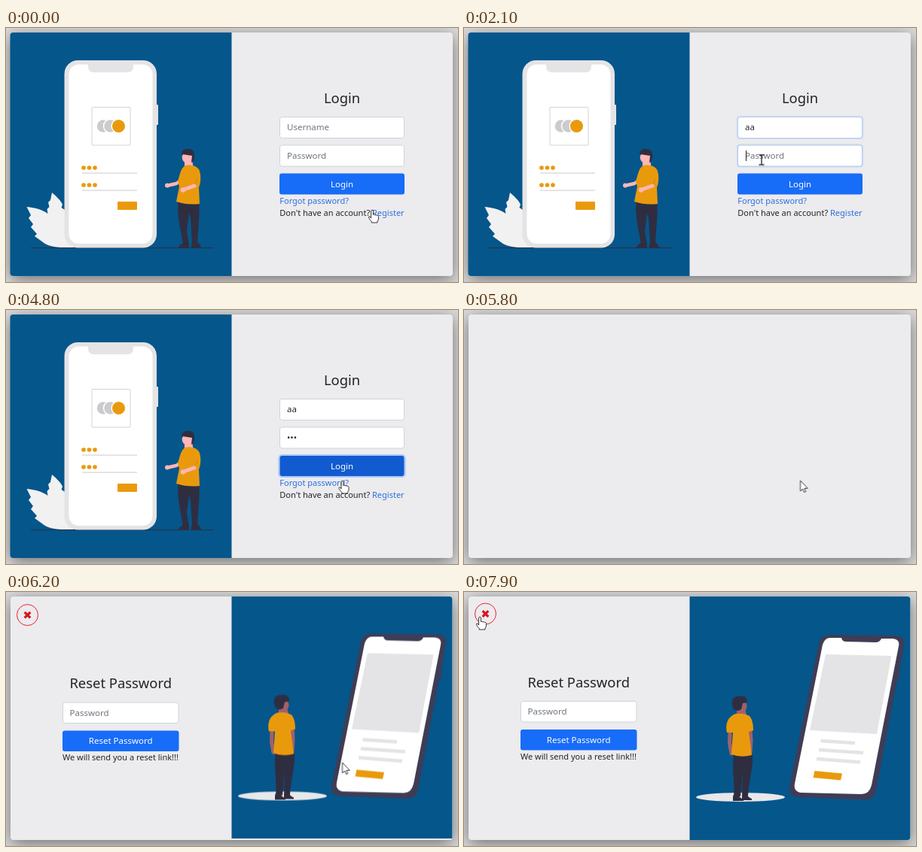
Recreate the animation shown at these times as an HTML page. Size 600x338 px, loop 8 s.

```html
<!DOCTYPE html>
<html lang="en">
<head>
<meta charset="utf-8">
<title>Login and password reset</title>
<style>
html, body { margin: 0; width: 100%; height: 100%; overflow: hidden; background: #dcdcdc; }
.stage { position: relative; width: 600px; height: 338px; overflow: hidden; }
.card { position: absolute; left: 5.5px; top: 6px; width: 587px; height: 324px; border-radius: 4px;
  background: #ecebee; box-shadow: 0 5px 22px rgba(0,0,0,.5); }
svg { position: absolute; left: 0; top: 0; }
text { font: 11.5px "Noto Sans", "Open Sans", sans-serif; fill: #212529; }
.h { font-size: 18.4px; }
.s { font-size: 11px; }
.mid { text-anchor: middle; }
.link { fill: #2b70dc; }
.hint { fill: #6f767d; }
.light { fill: #fff; }
.box { fill: #fff; stroke: #d0d3d8; }
.btn { fill: #176cf8; }
.ring { fill: none; stroke: #a9c9f7; stroke-width: 2.2; opacity: 0; }
.panel { fill: #05568b; }
.ink { fill: #2f2e41; }
.gold { fill: #e99a0c; }
.skin { fill: #ffb6b6; }
.brown { fill: #9f616a; }
.limb { fill: none; stroke-linecap: round; stroke-linejoin: round; }

/* Continuous motion */
.press, .ring, .slide, .cursor { animation: 8s linear infinite; }
.press { fill: #115ad0; opacity: 0; animation-name: press; }
.ring-user { animation-name: ringUser; }
.ring-pass { animation-name: ringPass; }
.ring-btn { animation-name: ringBtn; }
.rise { animation-name: rise; }
.drop { animation-name: drop; }
.cursor { animation-name: move; animation-timing-function: ease-in-out; }

/* Hard switches */
.flip { animation: 8s step-end infinite; }
.login { animation-name: login; }
.reset { animation-name: reset; }
.hint-user { animation-name: hintUser; }
.hint-pass { animation-name: hintPass; }
.type-user { animation-name: typeUser; }
.type-pass { animation-name: typePass; }
.caret { animation-name: caret; }
.blink { animation: blink 1s step-end infinite; }
.hand { animation-name: hand; }
.arrow { animation-name: arrow; }
.beam { animation-name: beam; }

@keyframes login { 0% { opacity: 1 } 71.875%, 100% { opacity: 0 } }
@keyframes reset { 0% { opacity: 0 } 71.875%, 100% { opacity: 1 } }
@keyframes rise {
  0%, 72.75% { transform: translateY(324px); animation-timing-function: ease }
  78%, 100% { transform: none }
}
@keyframes drop {
  0%, 72.75% { transform: translateY(-324px); animation-timing-function: ease }
  78%, 100% { transform: none }
}
@keyframes press {
  0%, 5.4% { opacity: 0 } 6.7% { opacity: .7 } 8.5%, 41.3% { opacity: 0 } 43.2%, 100% { opacity: 1 }
}
@keyframes ringUser { 0%, 12.5% { opacity: 0 } 14.4%, 25.3% { opacity: 1 } 27.2%, 100% { opacity: 0 } }
@keyframes ringPass { 0%, 25.3% { opacity: 0 } 27.2%, 47.5% { opacity: 1 } 49.4%, 100% { opacity: 0 } }
@keyframes ringBtn { 0%, 47.5% { opacity: 0 } 49.4%, 100% { opacity: 1 } }
@keyframes hintUser { 0% { opacity: 1 } 16.5%, 100% { opacity: 0 } }
@keyframes hintPass { 0% { opacity: 1 } 30%, 100% { opacity: 0 } }
@keyframes typeUser {
  0% { clip-path: inset(0 100% 0 0) } 16.5% { clip-path: inset(0 50% 0 0) } 18.5%, 100% { clip-path: inset(0) }
}
@keyframes typePass {
  0% { clip-path: inset(0 100% 0 0) } 30% { clip-path: inset(0 66.6% 0 0) }
  32.5% { clip-path: inset(0 33.3% 0 0) } 35%, 100% { clip-path: inset(0) }
}
@keyframes caret {
  0% { opacity: 0; transform: translate(373.5px, 132.5px) }
  12.5% { opacity: 1; transform: translate(373.5px, 132.5px) }
  16.5% { opacity: 1; transform: translate(380px, 132.5px) }
  18.5% { opacity: 1; transform: translate(386.5px, 132.5px) }
  25.3% { opacity: 1; transform: translate(373.5px, 170px) }
  30% { opacity: 1; transform: translate(378px, 170px) }
  32.5% { opacity: 1; transform: translate(382.5px, 170px) }
  35% { opacity: 1; transform: translate(387px, 170px) }
  47.5%, 100% { opacity: 0; transform: translate(387px, 170px) }
}
@keyframes blink { 0% { opacity: 1 } 50%, 100% { opacity: 0 } }
@keyframes move {
  0%, 3% { transform: translate(486px, 242px) }
  11%, 20.5% { transform: translate(415px, 134px) }
  24.5%, 38% { transform: translate(395px, 175.5px) }
  43.5%, 53% { transform: translate(411px, 202px) }
  58.5%, 80% { transform: translate(446.5px, 227px) }
  90%, 100% { transform: translate(21px, 33px) }
}
@keyframes hand {
  0% { opacity: 1 } 4.2% { opacity: 0 } 5.4% { opacity: 1 } 6.7% { opacity: 0 }
  41.3% { opacity: 1 } 71.875% { opacity: 0 } 88.6%, 100% { opacity: 1 }
}
@keyframes arrow {
  0% { opacity: 0 } 4.2% { opacity: 1 } 5.4% { opacity: 0 } 6.7% { opacity: 1 } 7.2% { opacity: 0 }
  40.2% { opacity: 1 } 41.3% { opacity: 0 } 71.875% { opacity: 1 } 88.6%, 100% { opacity: 0 }
}
@keyframes beam { 0% { opacity: 0 } 7.2% { opacity: 1 } 40.2%, 100% { opacity: 0 } }
</style>
</head>
<body>
<div class="stage">
<div class="card"></div>
<svg width="600" height="338" viewBox="0 0 600 338">
<defs>
  <clipPath id="card"><rect x="5.5" y="6" width="587" height="324" rx="4"/></clipPath>
  <g id="stars">
    <g id="star" class="limb" stroke="#e99a0c" stroke-width="2.2">
      <path d="M103 -2V2M101.2 -1L104.8 1M104.8 -1L101.2 1"/>
    </g>
    <use href="#star" x="7.5"/><use href="#star" x="15"/>
    <path d="M101 7.2H174" stroke="#d6d6d8" stroke-width="1.3"/>
  </g>
</defs>

<g clip-path="url(#card)">
  <g class="flip login">
    <rect class="panel" x="5" y="6" width="294.5" height="324"/>
    <!-- leaves -->
    <path fill="#f1f1f2" d="M87 292C70 293 56 291 49 285L38 277L41 274L33 265L36 261L30 253L33 249L27.500 238C39 239 49 242 55.500 247L54.500 241L57.500 238L56 232L59 229L61 219C68 225 73 230 75 235L73.500 239L78 242L90 262V292Z"/>
    <path d="M33 292.600H275" stroke="#2f2e41"/>
    <!-- phone -->
    <rect x="198" y="102" width="4" height="27" rx="1" fill="#e4e4e6"/>
    <rect x="77.500" y="43" width="122.500" height="249.500" rx="18" fill="#e4e4e6"/>
    <rect x="83.500" y="48.500" width="111" height="238.500" rx="13" fill="#fff"/>
    <path fill="#e4e4e6" d="M109 48V51Q109 59 117 59H161Q169 59 169 51V48Z"/>
    <rect x="114" y="105.500" width="51" height="50.500" rx="1" fill="#fff" stroke="#d3d3d6"/>
    <circle cx="129" cy="130.500" r="8.200" fill="#cbcbcd"/>
    <circle cx="138.500" cy="130.500" r="9" fill="#cbcbcd" stroke="#fff" stroke-width="1.500"/>
    <circle class="gold" cx="149.500" cy="130.500" r="9.300" stroke="#fff" stroke-width="1.500"/>
    <use href="#stars" y="186"/><use href="#stars" y="209"/>
    <rect class="gold" x="148" y="231" width="26" height="11" rx="1"/>
    <!-- man -->
    <path class="ink" d="M229 229L256 230C258 245 255 265 254 287L247 288L245 253L243 247L240 270L243 288L235 288C232 268 226 248 229 229Z"/>
    <path class="ink" d="M228 293Q230 288 236 286L243 287V293ZM246 293Q245 289 247 286L254 285Q259 289 259 293Z"/>
    <path class="skin" d="M237 176H247L249 187H237Z"/>
    <path class="limb" d="M232 203L226 207L215 209.500" stroke="#ffb6b6" stroke-width="4.500"/>
    <circle class="skin" cx="214" cy="209.500" r="3"/>
    <path class="gold" d="M238 183C245 181 252 183 256 188C259 194 259 205 256 212L257 234Q241 236 226 231L230 211L228 204C231 195 232 186 238 183Z"/>
    <path d="M254 200L251 210L242 213" fill="none" stroke="#c98309" stroke-width=".7"/>
    <path class="limb" d="M250 210L236 215" stroke="#ffb6b6" stroke-width="5"/>
    <circle class="skin" cx="235" cy="215.500" r="3.200"/>
    <circle class="skin" cx="241" cy="172.500" r="7.300"/>
    <path class="ink" d="M233 168C233 162 239 160 243 161C249 161 251 167 250 173Q249 178 246 179L247 170L234 168Z"/>

    <text class="h mid" x="446" y="99.700">Login</text>
    <rect class="box" x="363.500" y="118.500" width="165" height="28" rx="3"/>
    <rect class="ring ring-user" x="363" y="118" width="166" height="29" rx="3.500"/>
    <text class="hint flip hint-user" x="373" y="136.300">Username</text>
    <text class="flip type-user" x="373" y="136.300">aa</text>
    <rect class="box" x="363.500" y="156" width="165" height="28" rx="3"/>
    <rect class="ring ring-pass" x="363" y="155.500" width="166" height="29" rx="3.500"/>
    <text class="hint flip hint-pass" x="373" y="173.800">Password</text>
    <text class="flip type-pass" x="373" y="173.800">•••</text>
    <g class="flip caret"><path class="blink" d="M.5 -7V7" stroke="#222"/></g>
    <rect class="btn" x="363" y="193.500" width="166" height="28" rx="3"/>
    <rect class="press" x="363" y="193.500" width="166" height="28" rx="3"/>
    <rect class="ring ring-btn" x="362.500" y="193" width="167" height="29" rx="4"/>
    <text class="light mid" x="446" y="211.500">Login</text>
    <text class="s link" x="363.300" y="233.500">Forgot password?</text>
    <text class="s" x="363.300" y="250.300">Don't have an account? <tspan class="link">Register</tspan></text>
  </g>

  <g class="flip reset">
    <g class="slide rise">
      <circle cx="28.500" cy="29" r="14" fill="none" stroke="#e8232b"/>
      <path d="M24.700 25.200L32.300 32.800M32.300 25.200L24.700 32.800" stroke="#d9141c" stroke-width="3.200"/>
      <text class="h mid" x="152.200" y="126.500">Reset Password</text>
      <rect class="box" x="75.500" y="145.500" width="153.500" height="27.500" rx="3"/>
      <text class="hint" x="84.500" y="163.300">Password</text>
      <rect class="btn" x="75" y="183" width="154.500" height="27.500" rx="3"/>
      <text class="light mid" x="152.200" y="200.800">Reset Password</text>
      <text class="s" x="75" y="222.800">We will send you a reset link!!!</text>
    </g>
    <g class="slide drop">
      <rect class="panel" x="299.500" y="6" width="294" height="324"/>
      <ellipse cx="367" cy="273" rx="59" ry="6" fill="#e8e8ea"/>
      <!-- tilted phone -->
      <path fill="#3f3d56" d="M484 57L574 58Q585 59 584 70L578 104L578 112L574 122L547 264Q544 277 532 276.500L443 273Q430 271 432 259L471 68Q474 57 484 57Z"/>
      <path fill="#fff" d="M486 61L501 61Q502 66 507 66L546 67Q552 67 554 62L569 62Q579 63 577 72L541 257Q538 269 528 269L447 267Q437 265 439 255L476 70Q479 61 486 61Z"/>
      <path fill="#e4e3e5" d="M480 83L567.500 85L548 189L459 184Z"/>
      <path d="M473.500 198L519 201M471 210L530 214M468 222L526 226.500" stroke="#e4e3e5" stroke-width="4.500"/>
      <path class="gold" d="M465.500 238L502 241.500L500 250.500L463.500 247Z"/>
      <!-- man seen from behind -->
      <path class="brown" d="M357 270H364V276H357ZM370 266H377V274H370Z"/>
      <path class="ink" d="M358 215L383 216C384 235 378 252 377 271L369 272L370 240L367 272L358 273C360 251 355 238 358 215Z"/>
      <path class="ink" d="M357 278V272H365Q368 275 371 276V278ZM369 277V271H376Q379 274 382 275V277Z"/>
      <path class="limb" d="M353 185L352.500 201L355 215M380 182L381 198L380 213" stroke="#9f616a" stroke-width="5"/>
      <path class="brown" d="M362 154H373L375 164H362Z"/>
      <path class="gold" d="M361 162C368 161 374 162 379 165C383 170 384 177 384 184L378 186L382 217Q368 221 355 216L357 187L349 187C347 177 349 166 361 162Z"/>
      <ellipse class="brown" cx="370" cy="152" rx="5.500" ry="7"/>
      <path class="ink" d="M356 145C357 139 363 138 367 139C372 137 377 142 376 147L370 148L368 156Q363 160 358 156Q355 150 356 145Z"/>
    </g>
  </g>
</g>

<g class="cursor" stroke="#222" stroke-width=".9" stroke-linejoin="round">
  <path class="flip hand" fill="#fff" d="M-1.400 1Q0 -1 1.400 1V6.500Q2.700 5.500 4 7Q5.300 6 6.400 7.600Q8 6.800 8.500 8.600V12Q8 14 7 15.500V17H-.8V15.500Q-2.500 14 -4.500 10.500Q-4.800 8.500 -3 9L-1.400 11Z"/>
  <path class="flip arrow" fill="#fff" d="M0 0V14L3.200 11.200L5.200 15.600L7.300 14.600L5.300 10.300H9.800Z"/>
  <path class="flip beam" fill="none" stroke-width="1.300" d="M-3.500 -6.500H-1Q0 -6.500 0 -5.500Q0 -6.500 1 -6.500H3.500M0 -6V6M-3.500 6.500H-1Q0 6.500 0 5.500Q0 6.500 1 6.500H3.500"/>
</g>
</svg>
</div>
</body>
</html>
```
